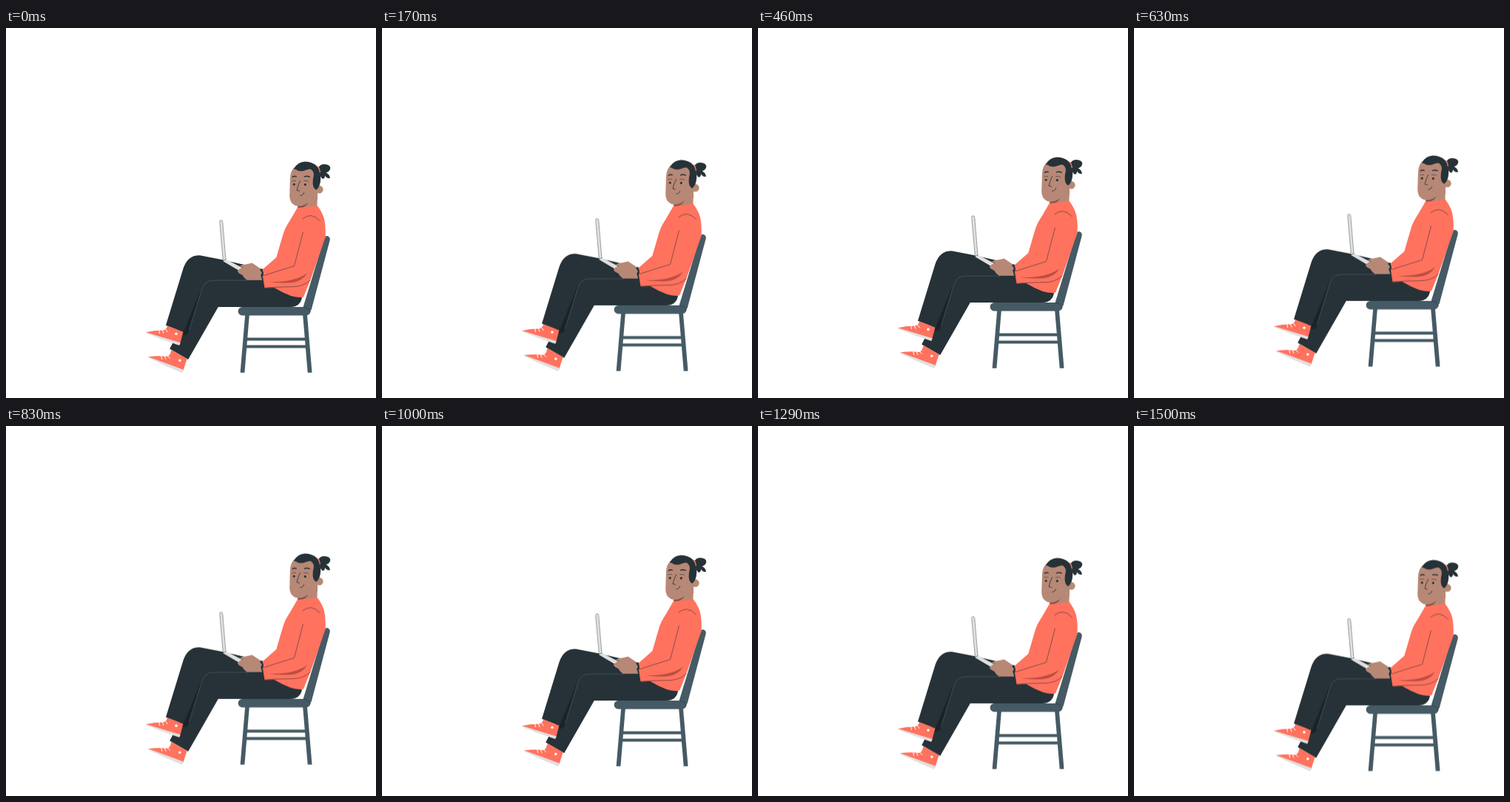
An HTML page for the animation above (1.54 s loop, 500x500 px).

```html
<!DOCTYPE html>
<html lang="en">
<head>
<meta charset="utf-8">
<title>Floating seat</title>
<style>
html, body { margin: 0; width: 100%; height: 100%; overflow: hidden; background: #fff; }
svg { display: block; width: 100%; height: 100%; }
.float { animation: float 770ms linear -40ms infinite alternate; }
@keyframes float {
  from { transform: translateY(.5px); }
  to { transform: translateY(-9.5px); }
}
.steel { fill: #455a64; }
.dark { fill: #263238; }
.deep { fill: #1a2428; }
.coral { fill: #ff725e; }
.skin { fill: #b78876; }
.pale { fill: #e0e0e0; }
.line { fill: none; stroke: #263238; stroke-width: .55; stroke-linecap: round; stroke-linejoin: round; }
.bold { stroke-width: 1.4; }
.lace { fill: none; stroke: #fff; stroke-width: 1; stroke-linecap: round; }
</style>
</head>
<body>
<svg viewBox="0 0 500 500">
<g class="float">
  <!-- chair -->
  <g class="steel">
    <path d="M429.8 284.5Q431.3 280.2 435 281.2Q438.4 282.6 437.6 287L412.6 381L401 379Z"/>
    <path d="M323.3 386H329L322.4 465.7H316.6Z"/>
    <path d="M401 386H406.8L413.5 465.7H407.7Z"/>
    <path d="M325.5 418.5H404.5V422.5H325.5ZM325 428.6H405V432.4H325Z"/>
    <rect x="313.6" y="377" width="97.8" height="11.4" rx="5.7"/>
  </g>
  <path class="line" d="M402.5 377.4Q408 377.6 410.6 382.5M411.8 380.5L410.8 384"/>

  <!-- far leg -->
  <path class="dark" d="M216 401.8L239.5 325Q245.5 306.6 262 307.2L293 313.2L347 325.8L352 352L270 362L239.8 411Z"/>

  <!-- near leg and shoe -->
  <path class="dark" d="M221.2 433.6L264.8 350Q268.6 341.5 279 341.2H347L400 361.5Q400.5 372 391 376Q388.5 376.9 384 376.9H286.8L246.2 448Z"/>
  <path class="coral" d="M192 444.3Q207 442.2 218.5 444Q222 442.4 223.6 435L244.6 447.1L239.3 463.5Q215 454 192 444.3Z"/>
  <path class="pale" d="M192 444.3Q216 453 239.8 461.7L238 466Q214 456.5 192.5 445.8Z"/>
  <path class="lace" d="M209.8 443.5L210.7 447.6M214.2 443.5L215.9 447.4M218.8 443.5L221.6 446.4"/>
  <circle cx="234.8" cy="449.2" r="1.7" fill="#fff"/>
  <path class="deep" d="M239.6 411L266 347L246.5 412Q243 416.5 239 414.6Z"/>
  <path d="M247.5 408.5L265 352Q268.8 341.3 280 341.1H328" fill="none" stroke="#53646c" stroke-width=".6"/>

  <!-- far shoe -->
  <path class="coral" d="M189 411.2Q200 408.2 212.5 408.4Q216.5 407.8 218.3 402.6L239.4 410.8L235.3 426.5Q213 419 189 411.2Z"/>
  <path class="pale" d="M189 411.2Q212 418 235.6 425.2L234.3 429Q211 421.5 189.5 412.5Z"/>
  <path class="lace" d="M206.8 408.6L207.6 412.8M211.4 408.4L213 412.4M215.6 407.2L218.2 410.8"/>
  <circle cx="230" cy="413.2" r="1.7" fill="#fff"/>

  <!-- laptop -->
  <path class="pale" d="M288.7 262.2Q288.5 260 290.4 259.8Q292.5 259.8 292.8 262L297 313L293.3 314.5Z"/>
  <path class="line" d="M293.3 314L288.7 262.2Q288.5 260 290.4 259.8Q292.5 259.8 292.8 262L297 312.5" stroke-dasharray="1 1.4"/>
  <path class="pale" d="M293 315L297.2 312.6L322 325.5L316 328.6Z"/>
  <path class="line" d="M293 315L297.2 312.6"/>

  <!-- hand -->
  <path class="skin" d="M312.8 328.4Q316 324.5 320.2 323.4L315.5 321.8Q320 319.6 325 319.3L332.6 317.6L346 326.5V340.8H325.8Q321.5 338 319 333.6Q314 331.6 312.8 328.4Z"/>
  <path class="dark" d="M342.8 326.2L347 325.8L349 341H346.2L344.2 333.8L346 331Z"/>

  <!-- neck -->
  <path class="skin" d="M394 228H421L420.2 242Q407 249 394.3 244Z"/>
  <path d="M394.3 240.2Q403 239.8 408.6 235.6Q405.5 242.8 394.3 244Z" fill="#8a4b3c"/>

  <!-- jumper -->
  <path class="coral" d="M393.8 242.8Q408 242.4 420.2 239.2Q426.8 248 429.6 256.5Q432.4 267 431.6 283L411.2 341L402 363.4Q396 365 385 362Q374 358 362.5 351L349.5 351.6L346.8 334.4L348.8 332.6L346.5 326.5L365.3 310L374.5 278.5Q377 270 383.5 260.5Z"/>
  <path d="M355 342.8Q390 344 407 331.2Q400.5 342.8 385 344.2Q367 345.4 355 342.8Z" fill="#b94f42"/>
  <path class="line" d="M401.4 276L389.5 321.5L347.2 334.8M349.5 351.2Q362 350 384 349.8Q402 350.2 411 341M401 257.8Q412.5 247.8 424.3 260.6"/>

  <!-- head -->
  <circle class="skin" cx="423.4" cy="218.3" r="5.2"/>
  <path class="skin" d="M389.5 188.5Q384 194 383.9 204L383.2 227Q383.4 236 390 239.4Q395 241.6 401 240Q407 238 411 233L421 232V190L404 184Z"/>
  <path class="dark" d="M388.8 190.2Q394.5 180.7 404.5 180.5Q414 180.7 420.2 186.8Q425.4 192 425.2 204Q424.8 214 419.4 218.8Q415.3 217 414.7 211Q414.4 204 415.8 200Q416.5 193.8 411.8 190.8Q408 190.2 404.5 192.3Q397 195.2 391.8 191.2Z"/>
  <path class="dark" d="M422.4 190Q422.8 184.5 430 184Q437.8 184.3 438.3 189Q438 194 432.6 195.4Q437.9 198.3 437.8 203Q433.4 203.4 430.9 199.4Q431.4 202.8 428.2 204Q424.2 201.5 424 195.2Z"/>
  <path d="M421.4 187Q423.8 190 424.4 195" fill="none" stroke="#ff725e" stroke-width="1.5"/>
  <path class="line bold" d="M387.4 201.4Q389.5 199.6 392.3 200.8M403.4 200.8Q407 199.4 410.2 201.2"/>
  <path class="line" d="M386.7 206.9Q389.4 205.6 391.8 206.7M402.4 206.6Q405.5 205.8 408.7 207.2"/>
  <circle class="dark" cx="389.2" cy="211.3" r="1.5"/>
  <circle class="dark" cx="404.3" cy="211.6" r="1.6"/>
  <path class="line" d="M397.6 206.5Q394.5 212 393 219.4L396.6 220.2M397.8 226.4Q401.6 226.4 402.7 222.4" style="stroke-width:.8"/>
</g>
</svg>
</body>
</html>
```
